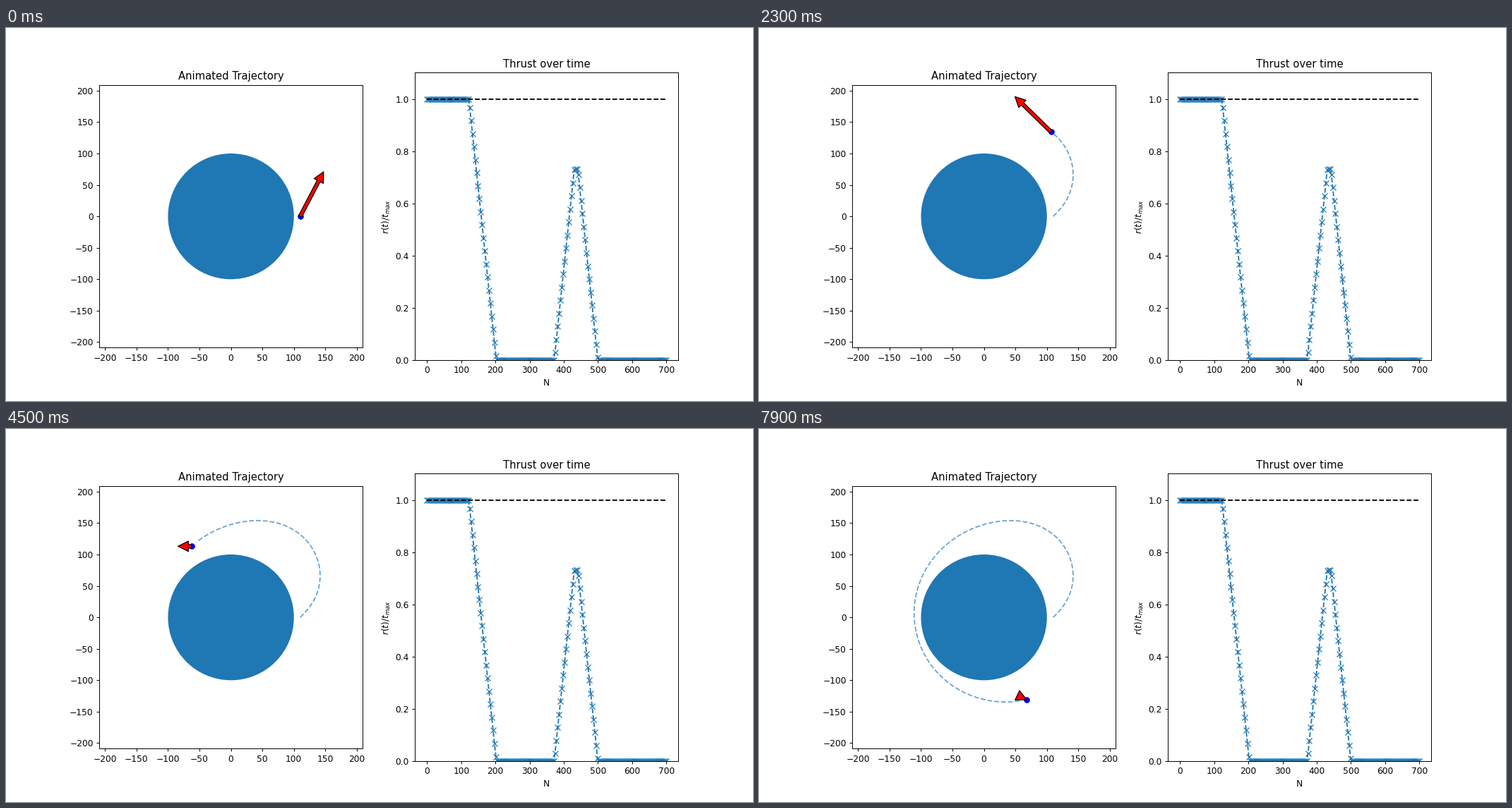
Recreate the animation shown at these times as a matplotlib script. Size 1058 px wide and 529 px high, loop 8000 ms.

```python
import numpy as np
import matplotlib.pyplot as plt
from matplotlib.animation import FuncAnimation

FRAMES = 80
SAMPLES = 175       # thrust samples over the whole flight
HANDOVER = 45       # step where the ascent joins the coasting orbit
CUTOFF = 50         # last step with thrust
ARROW = 80          # arrow length at full thrust, data units

# Coasting orbit: semi-major axis, eccentricity, periapsis angle and time
SMA, ECC, PERI, T_PERI = 147.8, 0.254, np.radians(193.2), 58.25
MOTION = 0.063


def coast(t):
    """Position on the Kepler ellipse, as an (x, y) pair of rows."""
    mean = MOTION * (t - T_PERI)
    anomaly = mean
    for _ in range(30):
        anomaly = mean + ECC * np.sin(anomaly)
    u = SMA * (np.cos(anomaly) - ECC)
    v = SMA * np.sqrt(1 - ECC**2) * np.sin(anomaly)
    c, s = np.cos(PERI), np.sin(PERI)
    return np.array([c * u - s * v, s * u + c * v])


def ascent(t):
    """Quintic from the launch state to the orbit state at handover."""
    pos, vel, acc = np.array([[110, 0], [7.15, 6.6], [-1.01, 0.04]])
    end, d, T = coast(HANDOVER), 0.05, HANDOVER
    before, after = coast(T - d), coast(T + d)
    end_vel = (after - before) / (2 * d)
    end_acc = (after - 2 * end + before) / d**2
    system = [[T**3, T**4, T**5],
              [3 * T**2, 4 * T**3, 5 * T**4],
              [6 * T, 12 * T**2, 20 * T**3]]
    gap = [end - pos - vel * T - acc * T**2 / 2,
           end_vel - vel - acc * T,
           end_acc - acc]
    coeffs = np.vstack([pos, vel, acc / 2, np.linalg.solve(system, gap)])
    return np.polynomial.polynomial.polyval(t, coeffs)


def thrust_profile(k):
    step = 0.05
    launch = np.clip(0.967 - step * (k - 31), 0, 1)
    rise = 0.028 + step * (k - 93)
    fall = 0.71 - step * (k - 110)
    burn = np.clip(np.minimum(rise, fall), 0, 0.73)
    return np.maximum(launch, burn)


def heading(k):
    """Thrust direction: pitches over while burning, then spins steadily."""
    steer = 62.4 + 4.27 * k - 0.058 * k**2 + 0.00047 * k**3
    spin = 153.4 - 12.75 * (k - 65)
    return np.radians(np.where(k <= CUTOFF, steer, spin))


k = np.arange(FRAMES)
path = np.where(k < HANDOVER, ascent(k), coast(k)).T
thrust = thrust_profile(np.arange(SAMPLES))
angle = heading(k)
reach = ARROW * np.maximum(thrust[:FRAMES], 1e-3)
tips = path + np.column_stack([reach * np.cos(angle), reach * np.sin(angle)])

fig, (ax, ax_t) = plt.subplots(1, 2, figsize=(12, 6), dpi=1058 / 12)

ticks = np.arange(-200, 201, 50)
ax.set(title="Animated Trajectory", aspect="equal", xticks=ticks,
       yticks=ticks, xlim=(-209, 209), ylim=(-209, 209))
ax.add_patch(plt.Circle((0, 0), 100, facecolor="C0", linewidth=0))
trail, = ax.plot([], [], "--", color="C0", alpha=0.65)
ship, = ax.plot([], [], "o", color="blue")
arrow = ax.annotate("", xy=tips[0], xytext=path[0],
                    arrowprops=dict(facecolor="red"))

ax_t.plot(np.linspace(0, 700, SAMPLES), thrust, "x--", color="C0")
ax_t.plot([0, 700], [1, 1], "k--")
ax_t.set(title="Thrust over time", ylim=(0, 1.1), xlabel="N",
         ylabel="$r(t)/t_{max}$")


def update(i):
    trail.set_data(path[:i].T)
    ship.set_data(path[i:i + 1].T)
    arrow.xy = tips[i]
    arrow.set_position(path[i])
    return trail, ship, arrow


anim = FuncAnimation(fig, update, frames=FRAMES, interval=100,
                     init_func=lambda: update(0), repeat=True, repeat_delay=0)
plt.show()
```
